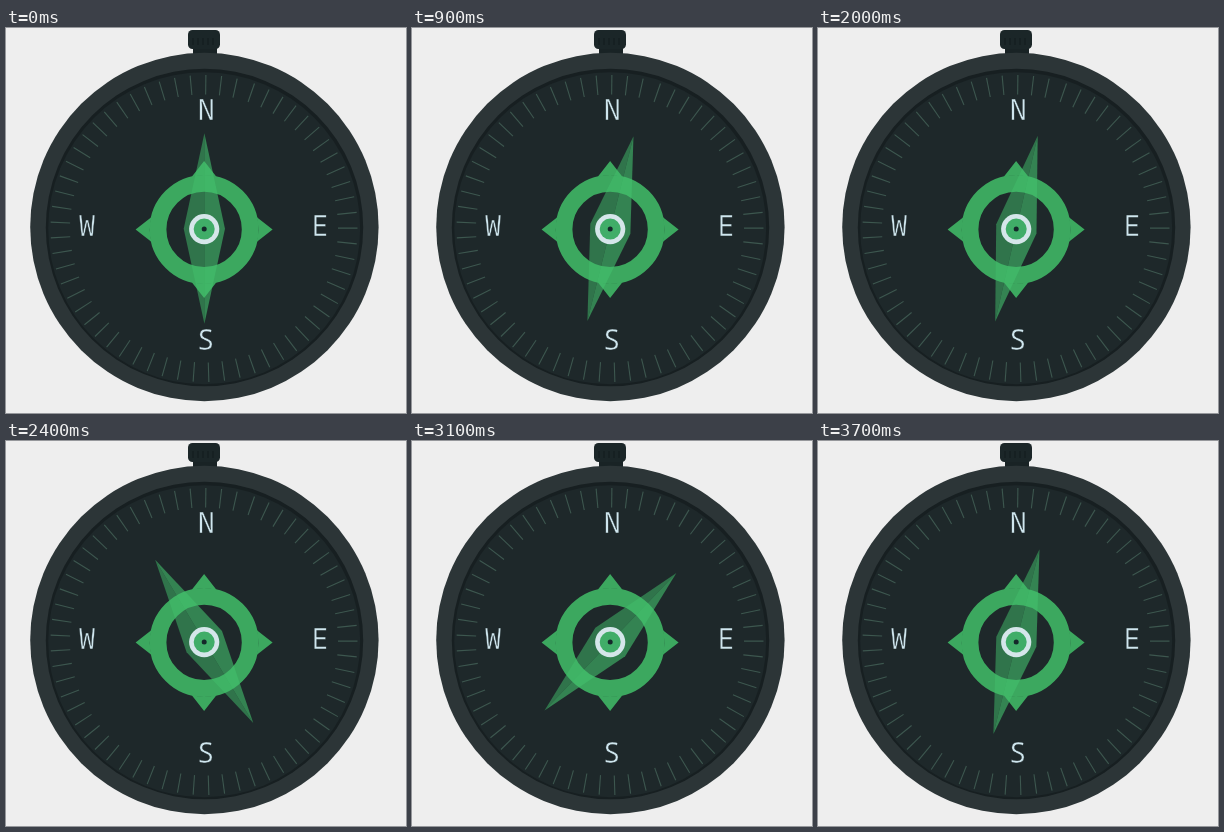
These frames come from a looping animation (400x385 px, 3.8 s). An HTML page:

```html
<!DOCTYPE html>
<html lang="en">
<head>
<meta charset="utf-8">
<title>Compass</title>
<style>
  html, body { margin: 0; height: 100%; overflow: hidden; background: #eee; }
  svg { display: block; width: 400px; height: 385px; }
  text {
    font: 400 28.5px "Noto Sans Mono", monospace;
    font-stretch: 62.5%;
    text-anchor: middle;
    fill: #cfe6ee;
    stroke: #1e282a;
    stroke-width: .4;
  }
</style>
</head>
<body>
<svg viewBox="0 0 400 385">
  <!-- crown and case -->
  <path d="M187 18h24v10h-24z" fill="#192325"/>
  <rect x="182" y="2" width="32" height="19" rx="4.5" fill="#1b2628"/>
  <path d="M187 10v7M192 10v7M197 10v7M202 10v7M207 10v7" stroke="#121b1d"/>
  <circle cx="198.4" cy="199" r="174.2" fill="#2c3537"/>
  <circle cx="198.5" cy="199.5" r="158.7" fill="#171f21"/>
  <circle cx="198.2" cy="200.3" r="156" fill="#1e282a"/>
  <g id="ticks" stroke="#3d574f" stroke-width="1.1"></g>

  <text x="200.3" y="92.3">N</text>
  <text x="314" y="208.3">E</text>
  <text x="199.5" y="322">S</text>
  <text x="81" y="208.3">W</text>

  <!-- rose -->
  <g transform="translate(198.1 201.4)" fill="#3ca85f">
    <circle r="46.1" fill="none" stroke="#3ca85f" stroke-width="16.8"/>
    <path id="point" d="M0-68.5L12.5-52.5Q0-56-12.5-52.5Z"/>
    <use href="#point" transform="rotate(90)"/>
    <use href="#point" transform="rotate(180)"/>
    <use href="#point" transform="rotate(270)"/>
  </g>

  <g id="needle" fill="#43c06d">
    <path d="M.4-95.5L21 0L.4 95Z" fill-opacity=".6"/>
    <path d="M.4-95.5L-20.3 0L.4 95Z" fill-opacity=".5"/>
  </g>

  <!-- hub -->
  <g transform="translate(198.2 201.1)">
    <circle r="15.1" fill="#d5e6ea"/>
    <circle r="10.5" fill="#40ad68"/>
    <circle r="2.5" fill="#14282a"/>
  </g>
</svg>
<script>
const LOOP = 3800, STEP = 100;
const TICKS = 61, FIRST_TICK = 19.2, TICK_GAP = 5.888;
const ticks = document.getElementById("ticks");
const needle = document.getElementById("needle");

for (let i = 0; i < TICKS; i++) {
  const line = document.createElementNS("http://www.w3.org/2000/svg", "path");
  line.setAttribute("d", "M198 47V66.5");
  line.setAttribute("transform", `rotate(${FIRST_TICK + i * TICK_GAP} 198 200.5)`);
  ticks.append(line);
}

// Swing of the needle: [ms, degrees]
const keys = [
  [0, 0], [400, 59], [500, 74], [600, 59], [900, 14], [1400, -61],
  [1500, -46], [1700, -5], [1900, 18], [2400, -31], [2500, -17.5],
  [2800, 88], [3000, 42], [3100, 43.8], [3600, 15.6], [3700, 14]
];

const slope = i => (keys[i + 1][1] - keys[i][1]) / (keys[i + 1][0] - keys[i][0]);

// Tangent that is flat at turning points, so the curve never overshoots
function tangent(i) {
  if (i === 0 || i === keys.length - 1) return 0;
  const a = slope(i - 1), b = slope(i);
  return a * b > 0 ? 2 * a * b / (a + b) : 0;
}

function angle(t) {
  const last = keys.length - 1;
  if (t >= keys[last][0]) return keys[last][1];
  const i = keys.findIndex(k => k[0] > t) - 1;
  const [t0, a0] = keys[i], [t1, a1] = keys[i + 1];
  const d = t1 - t0, u = (t - t0) / d, v = 1 - u;
  return a0 * v * v * (1 + 2 * u) + a1 * u * u * (3 - 2 * u)
    + d * u * v * (tangent(i) * v - tangent(i + 1) * u);
}

function draw(now) {
  const t = Math.floor(now % LOOP / STEP) * STEP;
  needle.setAttribute("transform", `translate(198 200.7) rotate(${angle(t)})`);
  requestAnimationFrame(draw);
}
draw(0);
</script>
</body>
</html>
```
